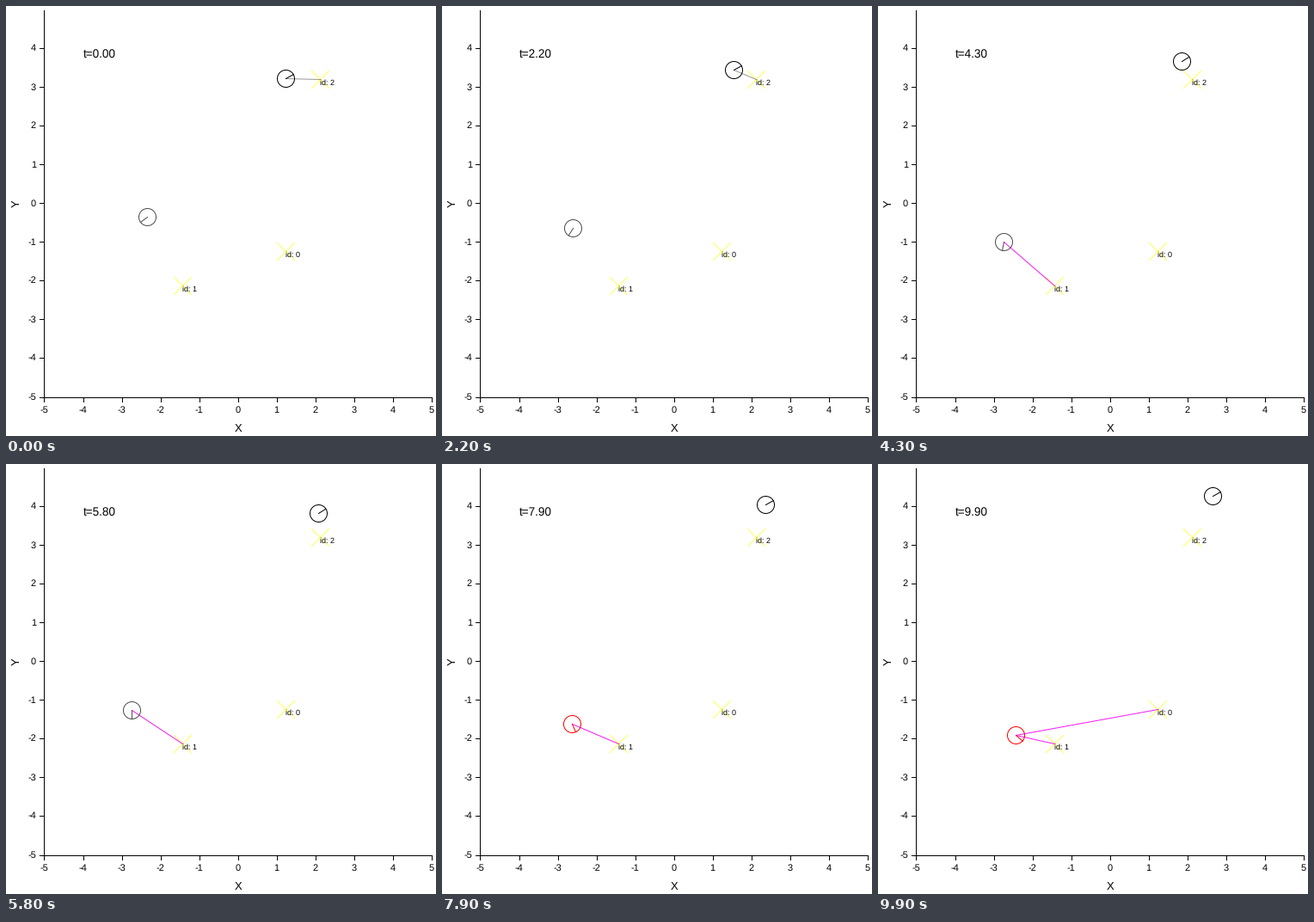
Animation of 500 by 500 pixels, one loop 10 s. Source, as a matplotlib script:

```python
import numpy as np
import matplotlib.pyplot as plt
from matplotlib.animation import FuncAnimation

SIZE, DPI, FRAMES, DT = 500, 100, 100, 0.1
UNIT = 45                     # pixels per world unit
RADIUS = 10
FOV = np.radians(62)
PX = 72 / DPI                 # one pixel in points
LANDMARKS = [(325.5, 285.5), (205.5, 325.5), (365.5, 85.5)]

plt.rcParams.update({"font.family": "Liberation Sans", "text.hinting": "none"})
fig = plt.figure(figsize=(SIZE / DPI, SIZE / DPI), dpi=DPI, facecolor="white")
ax = fig.add_axes([0, 0, 1, 1])
ax.set(xlim=(0, SIZE), ylim=(SIZE, 0))
ax.axis("off")


def line(xs, ys, color="black", z=2, **kw):
    return ax.plot(xs, ys, color=color, lw=PX, zorder=z, snap=False, **kw)[0]


def label(x, y, s, size, ha="center", va="baseline", **kw):
    return ax.text(x, y, s, fontsize=size * PX, ha=ha, va=va, zorder=6, **kw)


def draw_axes():
    flat = dict(solid_capstyle="butt")
    line([44.5, 44.5], [5, 456], **flat)
    line([44, 496], [455.5, 455.5], **flat)
    for v in range(-5, 6):
        x, y = 270 + UNIT * v, 229.5 - UNIT * v
        px = x + 0.5 if v > -5 else 44.5
        line([px, px], [456, 461], **flat)
        label(x - 0.5, 473, str(v), 11)
        if v < 5:
            py = y if v > -5 else 455.5
            line([39, 44], [py, py], **flat)
            label(35, y + 3, str(v), 11, ha="right")
    label(270, 495, "X", 13)
    label(12, 230, "Y", 13, va="center", rotation=90)


def draw_landmarks():
    for i, (x, y) in enumerate(LANDMARKS):
        for s in (1, -1):
            line([x - 10, x + 10], [y - 10 * s, y + 10 * s], "#ffff55")
        label(x - 0.5, y + 6, f"id: {i}", 9, ha="left")


def straight(t):
    return 325.5 + 6.48 * t, 84.6 - 4.72 * t, np.radians(30.5)


def arc(t):
    a = np.radians(216 + 10.3 * t)
    x, y = 191 + UNIT * np.sin(a), 281.9 + UNIT * np.cos(a)
    return x, y, a - np.radians(2)


def arc_color(t):
    if t < 6.45:
        return "#4c4c4c"
    return "#5a1414" if t < 7.75 else "#ff0000"


def pixel(v):
    """Centre of the pixel that holds v."""
    return np.floor(v) + 0.5


class Robot:
    def __init__(self, pose, color):
        self.pose, self.color = pose, color
        self.ring = plt.Circle((0, 0), RADIUS, fill=False, lw=PX,
                               zorder=4, snap=False)
        ax.add_patch(self.ring)
        self.nose = line([], [], z=4)
        self.rays = [line([], [], z=3) for _ in LANDMARKS]

    def update(self, t):
        x, y, a = self.pose(t)
        cx, cy = pixel(x), pixel(y)
        color = self.color(t)
        self.ring.center = (cx, cy)
        self.ring.set_edgecolor(color)
        self.nose.set_data([cx, pixel(x + RADIUS * np.cos(a))],
                           [cy, pixel(y - RADIUS * np.sin(a))])
        self.nose.set_color(color)
        for ray, (lx, ly) in zip(self.rays, LANDMARKS):
            turn = np.arctan2(y - ly, lx - x) - a
            turn = (turn + np.pi) % (2 * np.pi) - np.pi
            ray.set_data([cx, lx], [cy, ly])
            ray.set_color("#999999" if t < 3.35 else "#f41cf4")
            ray.set_visible(abs(turn) < FOV)


draw_axes()
draw_landmarks()
clock = label(90, 60, "", 13.5, ha="left")
robots = [Robot(straight, lambda t: "black"), Robot(arc, arc_color)]


def update(i):
    t = i * DT
    clock.set_text(f"t={t:.2f}")
    for robot in robots:
        robot.update(t)
    return []


anim = FuncAnimation(fig, update, frames=FRAMES, interval=1000 * DT,
                     repeat=True, repeat_delay=0, blit=False)
plt.show()
```
